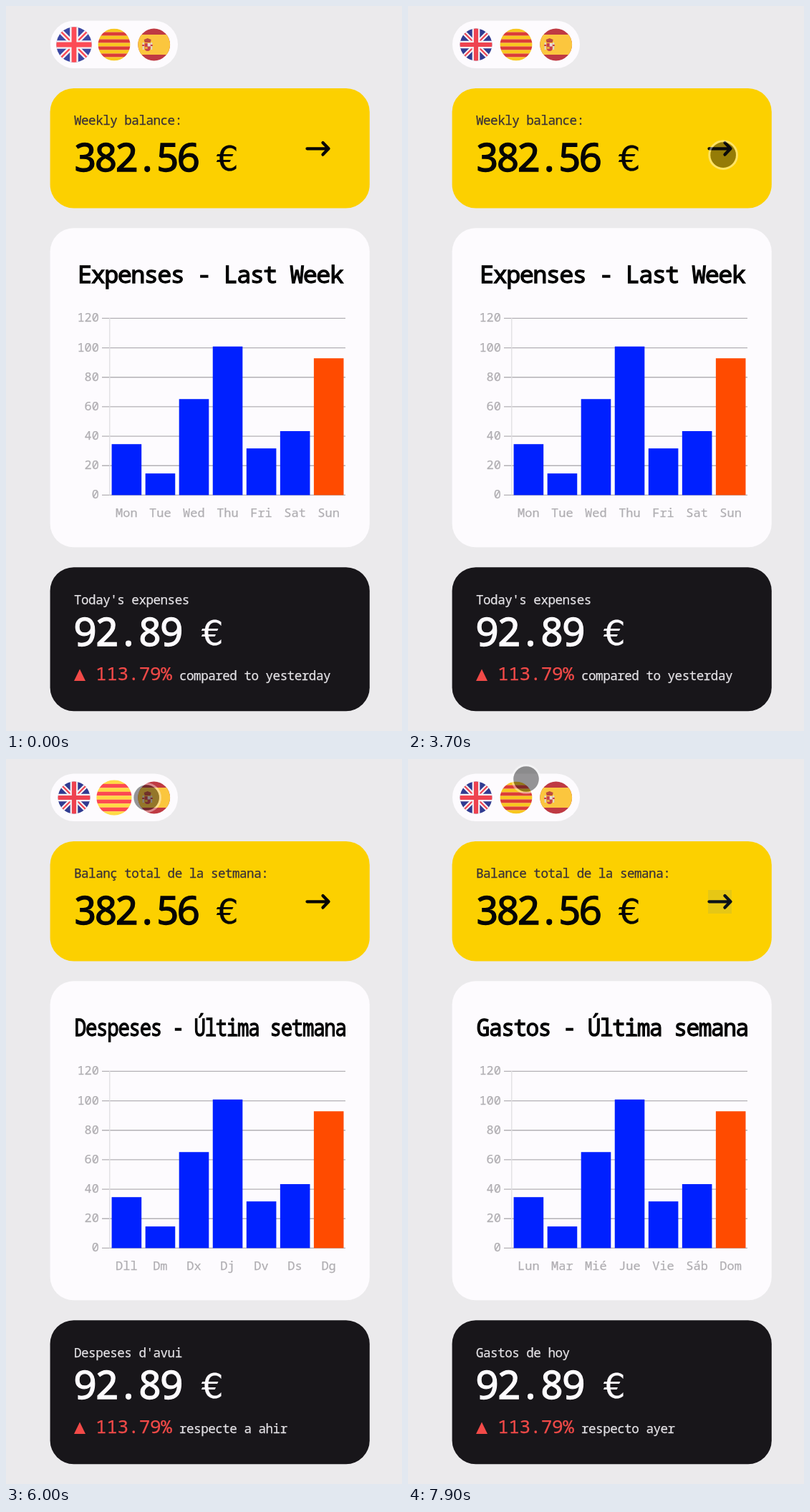
An HTML page that plays this animation: 553 px wide and 1013 px high, repeating every 8000 ms.

```html
<!DOCTYPE html>
<html lang="en">
<head>
<meta charset="utf-8">
<title>Weekly expenses</title>
<style>
  html, body { margin: 0; width: 100%; height: 100%; overflow: hidden; background: #ebeaec; }
  svg { display: block; width: 100%; height: 100%; }
  text { font-family: "Noto Sans Mono", "DejaVu Sans Mono", monospace; white-space: pre; stroke-width: .25; }
  .strong { font-weight: 500; stroke-width: 1.3; }
  .euro { font-family: "DejaVu Sans", sans-serif; font-size: 48px; }
  .flag { --red: #dc3d38; --gold: #f8c71f; --blue: #303b91; --cross: #ee4350; --band: #bf3a43; --field: #fbc63e; }
  .flag.hot { --red: #fc4a52; --gold: #ffda45; --blue: #3b47a3; --cross: #fc4b55; --band: #fc4650; --field: #ffdc52; }
</style>
</head>
<body>
<svg id="stage" viewBox="0 0 553 1013" preserveAspectRatio="none">
  <defs><clipPath id="disc"><circle r="22.4"/></clipPath></defs>
  <rect width="553" height="1013" fill="#ebeaec"/>
</svg>
<script>
const LOOP = 8000, STEP = 100;
const stage = document.getElementById('stage');

function add(parent, tag, attrs, text) {
  const el = document.createElementNS('http://www.w3.org/2000/svg', tag);
  for (const key in attrs) el.setAttribute(key, attrs[key]);
  if (text !== undefined) el.textContent = text;
  parent.appendChild(el);
  return el;
}
const box = (x, y, width, height, fill, rx = 0, parent = stage) =>
  add(parent, 'rect', { x, y, width, height, rx, fill });
const line = (d, stroke, width, parent = stage) =>
  add(parent, 'path', { d, stroke, 'stroke-width': width, fill: 'none' });
// pitch is the distance from one character to the next
const label = (x, y, size, pitch, fill, text = '', extra = {}) =>
  add(stage, 'text', {
    x, y, fill, stroke: fill, 'font-size': size,
    'letter-spacing': (pitch - size * .6).toFixed(2), ...extra
  }, text);
const euro = (x, y, fill) => add(stage, 'text', { x, y, fill, stroke: fill, class: 'euro' }, '€');

// Panels
const PAPER = '#fdfbfe', INK = '#050505';
box(62, 20.5, 178, 66.5, PAPER, 33);
box(61.6, 115, 446.2, 167.5, '#fcd000', 33);
box(61.6, 310.3, 446.2, 446, PAPER, 33);
box(61.6, 784.2, 446.2, 201, '#18161a', 33);

// Flags
const FLAG_X = [95, 151, 206.7], FLAG_Y = 54;
const flags = FLAG_X.map(() => {
  const g = add(stage, 'g', { class: 'flag' });
  return { g, art: add(g, 'g', { 'clip-path': 'url(#disc)' }) };
});
const [uk, cat, spain] = flags.map(f => f.art);

box(-23, -23, 46, 46, 'var(--blue)', 0, uk);
const saltire = 'M-23-23L23 23M23-23L-23 23', cross = 'M-23 0H23M0-23V23';
line(saltire, '#f5f3f6', 6.4, uk);
line(saltire, 'var(--cross)', 2.2, uk);
line(cross, '#f5f3f6', 10.6, uk);
line(cross, 'var(--cross)', 6.2, uk);

for (let i = 0; i < 9; i++)
  box(-23, -22.4 + i * 4.98, 46, 5.1, i % 2 ? 'var(--red)' : 'var(--gold)', 0, cat);

box(-23, -23, 46, 46, 'var(--band)', 0, spain);
box(-23, -14, 46, 28, 'var(--field)', 0, spain);
for (const x of [-16, -4.5]) {
  box(x, -3, 2, 10, '#dcd6d0', 0, spain);
  box(x - .6, 0, 3.2, 2, '#c8414b', 0, spain);
}
add(spain, 'path', { d: 'M-13-2H-5V5Q-5 9-9 9Q-13 9-13 5Z', fill: '#c8414b' });
box(-9, -2, 4, 4.5, '#e5ddd8', 0, spain);
box(-12.5, 3, 3.5, 3, '#eab13a', 0, spain);
add(spain, 'path', { d: 'M-13-3L-14-7L-9-9L-4-7L-5-3Z', fill: '#bd4a3f' });

// Balance card
const balance = label(95, 166, 17.6, 10.05, '#393038');
label(94, 230.7, 55, 28.9, INK, '382.56', { class: 'strong' });
euro(294, 230, INK);
add(stage, 'path', {
  d: 'M420.5 199.3H450M442.5 191L450.5 199.3L442.5 207.6', fill: 'none', stroke: INK,
  'stroke-width': 4.3, 'stroke-linecap': 'round', 'stroke-linejoin': 'round'
});

// Chart
const BASE = 683.4, UNIT = 2.058, TITLE_MAX = 379;
const VALUES = [34.6, 14.7, 65.2, 100.9, 31.7, 43.45, 92.89];
const title = label(0, 387, 33.5, 18.5, INK, '', { class: 'strong', 'text-anchor': 'middle' });
for (let v = 0; v <= 120; v += 20) {
  const y = BASE - v * UNIT;
  line(`M134 ${y}H474`, '#b3b1b5', 1.3);
  label(130, y + 5, 17, 10.2, '#b0aeb2', v, { 'text-anchor': 'end' });
}
line(`M144.8 436V${BASE}`, '#dfdde1', 1.3);
const bars = VALUES.map((v, i) => box(147.6 + i * 47.05, BASE, 41.6, 0, i < 6 ? '#0020ff' : '#ff4b00'));
const days = VALUES.map((v, i) => label(168.3 + i * 47.05, 714, 17, 10.2, '#b0aeb2', '', { 'text-anchor': 'middle' }));

// Today card
const today = label(95, 835.5, 17.6, 10.05, '#e3e1e5');
label(94, 893.7, 55, 30.2, PAPER, '92.89', { class: 'strong' });
euro(273, 893, PAPER);
add(stage, 'path', { d: 'M95 943L103 926.5L111 943Z', fill: '#f24a48' });
label(125, 942, 26, 15.2, '#f24a48', '113.79%');
const versus = label(242, 942, 17.6, 10.05, '#e3e1e5');

// Touch feedback
const glow = add(stage, 'rect', { fill: '#3c82be' });
const pointer = add(stage, 'g', {});
add(pointer, 'circle', { r: 19.3, fill: 'none', stroke: '#fff', 'stroke-opacity': .4, 'stroke-width': 3 });
add(pointer, 'circle', { r: 17.8, fill: '#101010', 'fill-opacity': .44 });

const LANGS = [
  { from: 0, balance: 'Weekly balance:', title: 'Expenses - Last Week', today: "Today's expenses",
    versus: 'compared to yesterday', days: 'Mon Tue Wed Thu Fri Sat Sun' },
  { from: 4696.4, balance: 'Balanç total de la setmana:', title: 'Despeses - Última setmana', today: "Despeses d'avui",
    versus: 'respecte a ahir', days: 'Dll Dm Dx Dj Dv Ds Dg' },
  { from: 6361, balance: 'Balance total de la semana:', title: 'Gastos - Última semana', today: 'Gastos de hoy',
    versus: 'respecto ayer', days: 'Lun Mar Mié Jue Vie Sáb Dom' }
];
const HOT = [[0, 2400], [4600, 6300], [6350, 7750]];
// start, end, x, y, size
const GLOWS = [[4650, 4950, 126, 29, 51], [7700, LOOP, 419, 183, 33]];
// time, x, y
const PATH = [
  [950, 97, 67], [1700, 97, 67], [2150, 440, 205], [2350, 496, 208], [2700, 446, 215],
  [3800, 440, 208], [4400, 146, 48], [5500, 146, 48], [5900, 196, 54], [6500, 198, 54],
  [7150, 198, 54], [7550, 436, 202], [7720, 436, 202], [7900, 165, 28], [LOOP, 165, 28]
];

const within = (t, [from, to]) => t >= from && t < to;

function pointerAt(t) {
  const i = PATH.findIndex(p => p[0] > t);
  if (i < 1) return null;
  const [a, b] = [PATH[i - 1], PATH[i]];
  const p = (t - a[0]) / (b[0] - a[0]), e = p * p * (3 - 2 * p);
  return [a[1] + (b[1] - a[1]) * e, a[2] + (b[2] - a[2]) * e];
}

let shown;
function setLanguage(lang) {
  if (shown === lang) return;
  shown = lang;
  balance.textContent = lang.balance;
  today.textContent = lang.today;
  versus.textContent = lang.versus;
  title.textContent = lang.title;
  lang.days.split(' ').forEach((d, i) => days[i].textContent = d);
  // Long titles condense to the chart's width
  const fit = Math.min(1, TITLE_MAX / title.getComputedTextLength());
  title.setAttribute('transform', `translate(285.2 0) scale(${fit} 1)`);
}

function render(t) {
  const lang = LANGS.filter(l => l.from <= t).pop();
  setLanguage(lang);

  const p = lang.from ? Math.min(1, (t - lang.from) / 1000) : 1;
  const grow = 1 - (1 - p) ** 4;
  bars.forEach((bar, i) => {
    const h = VALUES[i] * UNIT * grow;
    bar.setAttribute('y', BASE - h);
    bar.setAttribute('height', h);
  });

  flags.forEach(({ g }, i) => {
    const hot = within(t, HOT[i]);
    g.classList.toggle('hot', hot);
    g.setAttribute('transform', `translate(${FLAG_X[i]} ${FLAG_Y}) scale(${hot ? 1.1 : 1})`);
  });

  const tap = GLOWS.find(s => within(t, s));
  glow.style.display = tap ? '' : 'none';
  if (tap) {
    const [from, to, x, y, size] = tap;
    const opacity = .33 * (to - t) / (to - from);
    for (const [k, v] of Object.entries({ x, y, width: size, height: size, opacity })) glow.setAttribute(k, v);
  }

  const at = pointerAt(t);
  pointer.style.display = at ? '' : 'none';
  if (at) pointer.setAttribute('transform', `translate(${at[0]} ${at[1]})`);
}

function tick() {
  // The picture changes ten times a second
  const t = (performance.now() + 8) % LOOP;
  render(Math.floor(t / STEP) * STEP);
  requestAnimationFrame(tick);
}
tick();
</script>
</body>
</html>
```
